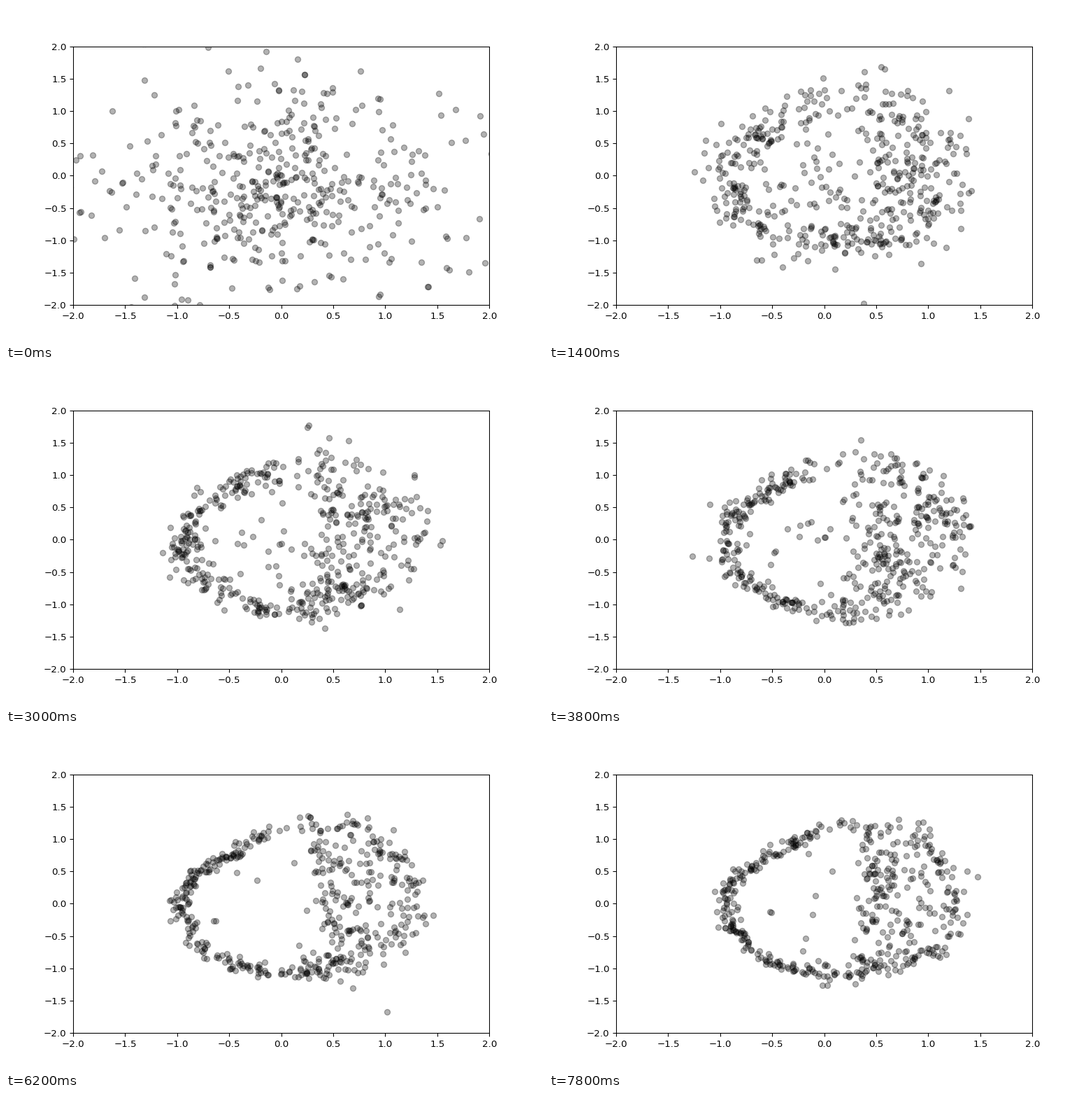
These frames come from a looping animation (768 px wide and 480 px high, 8 s). A matplotlib script:

```python
import numpy as np
import matplotlib.pyplot as plt
from matplotlib.animation import FuncAnimation

FRAMES, INTERVAL = 40, 200
POINTS = 500
CENTRE = np.array([0.1, 0.0])


def bump(deg, middle, width):
    return np.exp(-((deg - middle) / width) ** 2)


def outline(deg):
    """Lopsided circle: bulge at the upper right, dent at the upper left."""
    a = np.radians(deg)
    r = (1.12 + 0.06 * np.cos(a - 0.35)
         + 0.22 * bump(deg, 70, 25) - 0.13 * bump(deg, 130, 30))
    return CENTRE + np.column_stack([r * np.cos(a), r * np.sin(a)])


def cloud(rng):
    """Wide blob of the untrained generator."""
    return np.column_stack([0.05 + 0.82 * rng.standard_t(6, POINTS),
                            -0.2 + 0.72 * rng.standard_t(6, POINTS)])


def ring(rng, frame):
    """Ring with a sharp left side and a folded sheet on the right."""
    early = np.exp(-max(frame - 6, 0) / 8)
    late = frame / (FRAMES - 1)
    left_blur = 0.05 + 0.12 * early
    right_blur = 0.05 + 0.15 * early ** 0.5
    fold_x = 0.38 + 0.14 * early

    n_left = int(0.42 * POINTS)
    n_right = int((0.05 + 0.16 * late ** 2) * POINTS)
    n_inner = int((0.015 + 0.1 * early) * POINTS)
    n_fan = POINTS - n_left - n_right - n_inner

    left = outline(rng.uniform(95, 285, n_left))
    left += rng.normal(0, left_blur, left.shape)

    right = outline(rng.uniform(-75, 60, n_right))
    right += right_blur * rng.standard_t(5, right.shape)

    inner = outline(rng.uniform(70, 290, n_inner))
    inner = CENTRE + rng.uniform(0.1, 0.9, (n_inner, 1)) * (inner - CENTRE)

    # Even in height, spread from the fold line to the outline.
    edge = outline(np.degrees(np.arcsin(rng.uniform(-0.95, 1, n_fan))))
    fold = np.column_stack([fold_x - 0.08 * edge[:, 1] ** 2,
                            0.95 * edge[:, 1]])
    fan = fold + rng.random((n_fan, 1)) ** 1.35 * (edge - fold)
    fan += 0.9 * right_blur * rng.standard_t(5, fan.shape)
    return np.vstack([left, right, inner, fan])


def sample(frame):
    rng = np.random.default_rng(410 + frame)
    settled = min(frame / 6, 1) ** 0.7
    pts = (1 - settled) * cloud(rng) + settled * ring(rng, frame)
    rng.shuffle(pts)
    # Some points cling to others, a couple stray outwards.
    n = POINTS // 12
    pts[:n] = pts[n:2 * n] + rng.normal(0, 0.025, (n, 2))
    pts[-2:] *= rng.uniform(1.0, 1.6, (2, 1))
    return pts


fig, ax = plt.subplots(figsize=(8, 5), dpi=96)
ticks = np.arange(-2, 2.1, 0.5)
ax.set(xlim=(-2, 2), ylim=(-2, 2), xticks=ticks, yticks=ticks)
dots, = ax.plot([], [], "o", color="black", alpha=0.3)


def draw(frame):
    dots.set_data(*sample(frame).T)
    return dots,


anim = FuncAnimation(fig, draw, frames=FRAMES, interval=INTERVAL,
                     init_func=lambda: draw(0), repeat=True, repeat_delay=0)
plt.show()
```
